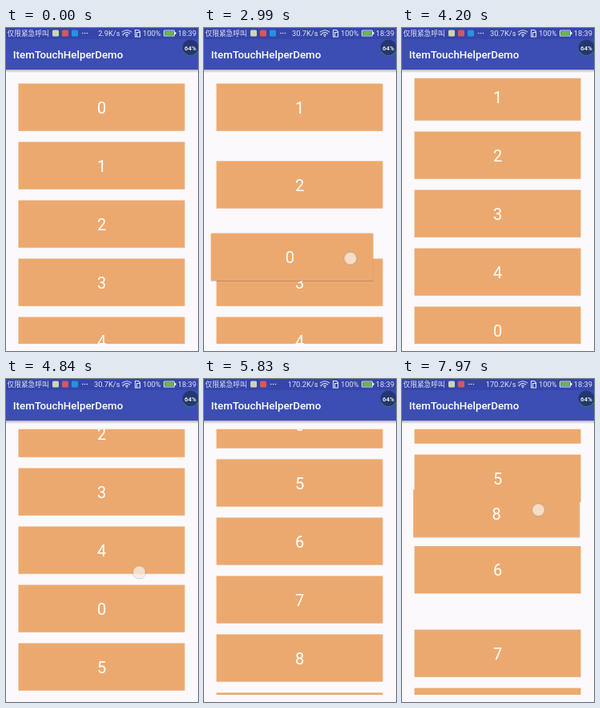
These frames come from a looping animation (240x404 px, 8 s). An HTML page:

```html
<!DOCTYPE html>
<html lang="en">
<head>
<meta charset="utf-8">
<title>Drag and drop list</title>
<style>
  html, body { margin: 0; width: 100%; height: 100%; overflow: hidden; background: #fbf9fc; }
  svg { display: block; width: 100%; height: 100%; }
  text { fill: #fff; font-family: Roboto, "Noto Sans CJK SC", "Noto Sans CJK", sans-serif; }
  .status text { font-size: 9.3px; fill: #e3e6f5; }
  .title { font-size: 13.33px; font-weight: 500; }
  .item rect { fill: #eca96f; }
  .item .shadow { fill: #000; opacity: 0; }
  .item.lifted .shadow { opacity: .17; }
  .item text { font-size: 20px; text-anchor: middle; }
</style>
</head>
<body>
<svg viewBox="0 0 240 404">
  <defs>
    <clipPath id="listArea"><rect x="8.7" y="62.8" width="222.6" height="332.2"/></clipPath>
    <linearGradient id="barShadow" x2="0" y2="1">
      <stop stop-color="#000" stop-opacity=".28"/>
      <stop offset="1" stop-color="#000" stop-opacity="0"/>
    </linearGradient>
  </defs>
  <rect width="240" height="404" fill="#fbf9fc"/>
  <g id="list" clip-path="url(#listArea)"></g>

  <rect y="52" width="240" height="4" fill="url(#barShadow)"/>
  <rect width="240" height="52" fill="#3c4eb4"/>
  <rect width="240" height="14" fill="#3545a9"/>
  <text class="title" x="8.8" y="38">ItemTouchHelperDemo</text>

  <g class="status">
    <text x="1.5" y="10" style="font-size:8.7px">仅限紧急呼叫</text>
    <rect x="58" y="2.5" width="8" height="8" rx="1.5" fill="#cbd6b4"/>
    <rect x="70" y="2.5" width="8" height="8" rx="1.5" fill="#d9575a"/>
    <rect id="thirdIcon" x="82" y="2.5" width="8" height="8" rx="1.5" fill="#2593e2"/>
    <g id="more" fill="#e3e6f5">
      <circle cx="95.8" cy="6.5" r=".8"/><circle cx="98.6" cy="6.5" r=".8"/><circle cx="101.4" cy="6.5" r=".8"/>
    </g>
    <text id="speed" x="142.5" y="10" text-anchor="end">2.9K/s</text>
    <g fill="none" stroke="#e3e6f5" stroke-width="1.1">
      <path d="M145 5.2q6-5 12 0M147 7.2q4-3.2 8 0M149.2 9q1.8-1.4 3.6 0"/>
      <path d="M161.5 2.5h4l2 2v6.500h-6zM163.500 5.500h4v5.500h-4z"/>
      <rect x="197.500" y="3" width="13" height="7" rx="1"/>
    </g>
    <circle cx="151" cy="10.300" r=".9" fill="#e3e6f5"/>
    <path id="activity" d="M145 7.500h2.600l-1.300 2.200z" fill="#e3e6f5"/>
    <rect x="198.500" y="4" width="11" height="5" fill="#69b64c"/>
    <rect x="211" y="5" width="1.500" height="3" fill="#e3e6f5"/>
    <text x="171" y="10">100%</text>
    <text x="214.800" y="10">18:39</text>
  </g>

  <circle cx="230.500" cy="24.500" r="10" fill="#24386f"/>
  <path d="M221.500 29a10 10 0 0 0 18 0" fill="none" stroke="#35706f" stroke-width="1.300"/>
  <text x="230.500" y="27.600" text-anchor="middle" style="font-size:8px;font-weight:500">64%</text>

  <g id="touch">
    <circle r="8.300" fill="#fff" fill-opacity=".35" stroke="#8d8583" stroke-opacity=".45" stroke-width=".9"/>
    <circle r="6.800" fill="#f7e6d6" fill-opacity=".72"/>
  </g>
</svg>
<script>
const LOOP = 8000, PITCH = 73, TOP = 69.5, LEFT = 15.5, MOVE_MS = 250;
const WIDTH = 208, HEIGHT = 59.3;
const DROP = 3905, SECOND_TOUCH = 4670, FLING = 4900, FLING_MS = 1450, THIRD_TOUCH = 6350;
const $ = id => document.getElementById(id);

const clamp = v => Math.min(1, Math.max(0, v));
const mix = (a, b, p) => a + (b - a) * p;
const ease = p => (1 - Math.cos(Math.PI * clamp(p))) / 2;

// Piecewise linear value through [time, value] points.
function track(t, points) {
  if (t <= points[0][0]) return points[0][1];
  for (let i = 1; i < points.length; i++) {
    const [t0, v0] = points[i - 1], [t1, v1] = points[i];
    if (t < t1) return mix(v0, v1, (t - t0) / (t1 - t0));
  }
  return points[points.length - 1][1];
}

const firstDragY = [[1660, 0], [2120, 26], [2440, 102], [2838, 146], [2990, 187],
  [3270, 226], [3596, 287], [3650, 297.5], [3780, 301]];
const firstDragX = [[1660, 0], [2120, -.8], [2440, -1.2], [2990, -12], [3270, -20], [3650, -31]];
const secondDragY = [[7140, 0], [7970, -175], [8000, -181]];
const secondDragX = [[7140, 0], [7500, -7], [7970, -1.3]];
const scrollPoints = [[3480, 0], [3650, 5.5], [3760, 13], [SECOND_TOUCH, 13], [4840, 103.5], [FLING, 135]];

// Neighbours give way as the dragged card passes: [start time, slot change].
const shifts = { 1: [2318, -1], 2: [2838, -1], 3: [3215, -1], 4: [3596, -1], 7: [7490, 1], 6: [7835, 1] };

function scrollAt(t) {
  if (t < FLING) return track(t, scrollPoints);
  return 340 - 205 * (1 - clamp((t - FLING) / FLING_MS)) ** 3.46;
}

function place(n, t) {
  const scroll = scrollAt(t);
  const slotY = slot => TOP + slot * PITCH - scroll;
  if (n === 0) {
    const settle = ease((t - DROP) / MOVE_MS);
    const dragged = TOP + track(t, firstDragY);
    return {
      x: track(t, firstDragX) * (1 - settle),
      y: mix(dragged, slotY(4), settle),
      lifted: t >= 1660 && settle < 1
    };
  }
  if (n === 8) return { x: track(t, secondDragX), y: slotY(8) + track(t, secondDragY), lifted: t >= 7140 };
  const [start, change] = shifts[n] || [0, 0];
  return { x: 0, y: slotY(n + change * ease((t - start) / MOVE_MS)), lifted: false };
}

function touchAt(t) {
  if (t >= 1040 && t < DROP) {
    const dy = track(t, firstDragY);
    return [195 + track(t, firstDragX), Math.min(398, 97 + dy + Math.min(4, dy / 13))];
  }
  if (t >= SECOND_TOUCH && t < FLING) {
    return [track(t, [[SECOND_TOUCH, 170], [4840, 166.5]]),
      track(t, [[SECOND_TOUCH, 338], [4840, 242], [FLING, 210]])];
  }
  if (t >= THIRD_TOUCH) return [171.8 + track(t, secondDragX), 339 + track(t, secondDragY)];
  return null;
}

// The two draggable cards come last so they are painted on top.
const cards = [1, 2, 3, 4, 5, 6, 7, 9, 10, 0, 8].map(n => {
  const size = `width="${WIDTH}" height="${HEIGHT}"`;
  $("list").insertAdjacentHTML("beforeend",
    `<g class="item"><rect class="shadow" y="1.1" ${size}/><rect ${size}/>` +
    `<text x="${WIDTH / 2}" y="37.4">${n}</text></g>`);
  return { n, node: $("list").lastElementChild };
});

function render(t) {
  for (const { n, node } of cards) {
    const { x, y, lifted } = place(n, t);
    node.setAttribute("transform", `translate(${LEFT + x} ${y})`);
    node.classList.toggle("lifted", lifted);
  }
  const touch = touchAt(t);
  $("touch").style.display = touch ? "" : "none";
  if (touch) $("touch").setAttribute("transform", `translate(${touch})`);

  const wide = t >= FLING;
  $("speed").textContent = wide ? "170.2K/s" : t >= 2800 ? "30.7K/s" : "2.9K/s";
  $("thirdIcon").style.display = wide ? "none" : "";
  $("more").setAttribute("transform", `translate(${wide ? -12 : 0} 0)`);
  $("activity").style.display = t >= 800 && t < 2000 ? "none" : "";
}

function frame() {
  render(performance.now() % LOOP);
  requestAnimationFrame(frame);
}
frame();
</script>
</body>
</html>
```
